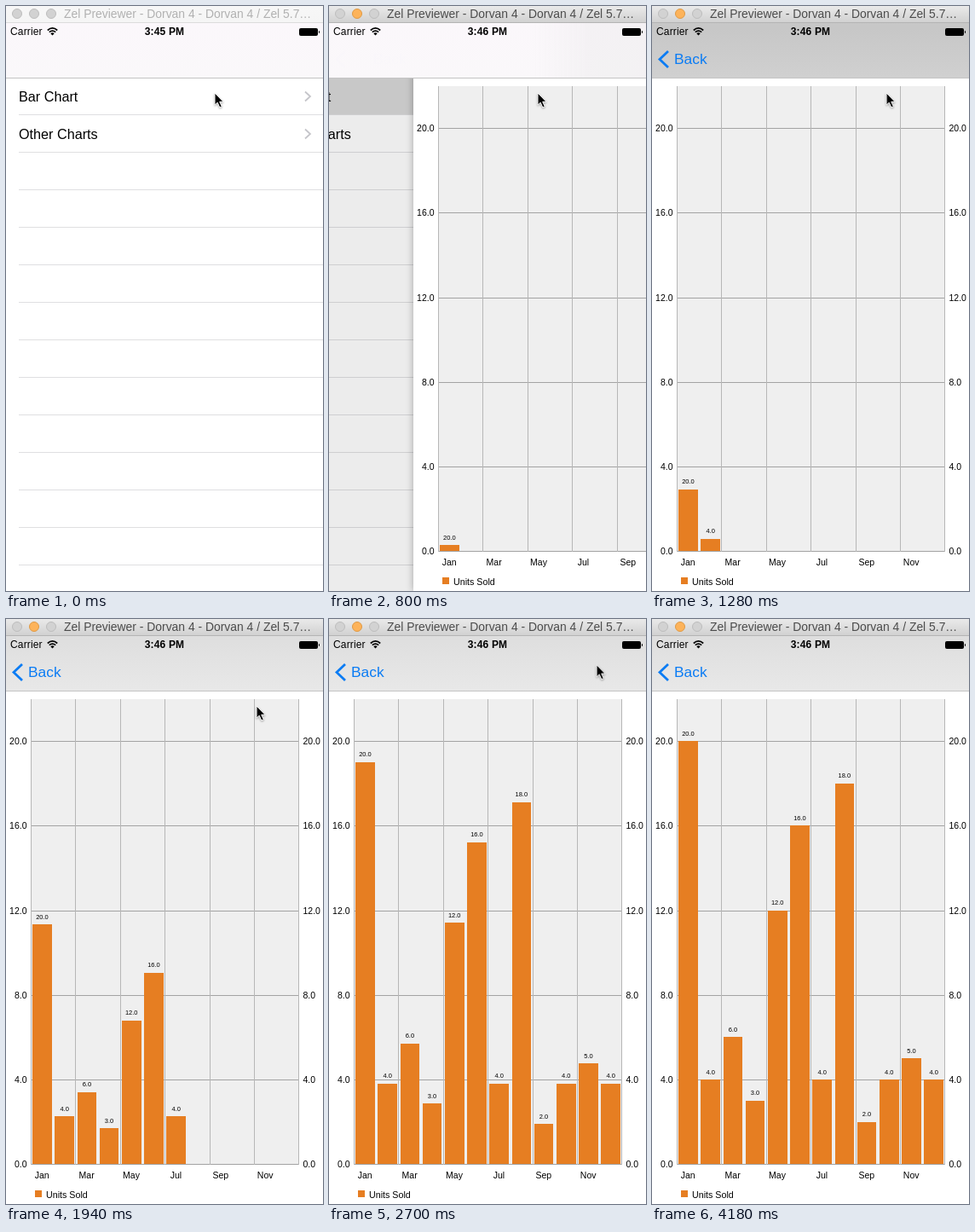
These frames come from a looping animation (372 by 686 pixels, 4.2 s). An HTML page:

```html
<!DOCTYPE html>
<html lang="en">
<head>
<meta charset="utf-8">
<title>Bar chart demo</title>
<style>
@property --t { syntax: "<number>"; inherits: true; initial-value: 0; }

html, body { margin: 0; width: 100%; height: 100%; overflow: hidden; background: #fff; }
body { position: relative; font-family: "Liberation Sans", Arial, sans-serif; color: #000; }
div, svg { position: absolute; }
.stage { left: 0; top: 0; width: 372px; height: 686px; overflow: hidden; background: #fff; }
.stage, .stage * { animation-duration: 4200ms; animation-iteration-count: infinite; animation-timing-function: linear; }
.fill { inset: 0; }
.text { line-height: 20px; white-space: nowrap; }
svg { overflow: visible; fill: none; }

/* Window title bar */
.window { left: 0; top: 0; width: 372px; height: 19px; border-bottom: 1px solid; animation-name: focus; animation-timing-function: step-end; }
.window .text { left: 68px; top: -1px; font-size: 13.9px; }
.dot { top: 3px; width: 10px; height: 10px; border: 1px solid #bdbdbd; border-radius: 50%; background: #d2d2d2; }
.dot.mid { background: var(--mid); border-color: var(--rim); }
@keyframes focus {
  0% { background: linear-gradient(#f7f7f7, #f5f5f5); color: #b1b1b1; border-color: #dcdcdc; --mid: #d2d2d2; --rim: #bdbdbd; }
  6.67%, 100% { background: linear-gradient(#eaeaea, #d1d1d1); color: #4c4c4c; border-color: #b4b4b4; --mid: #fdb35a; --rim: #df9a45; }
}

/* Navigation and status bars */
.nav { left: 0; top: 20px; width: 372px; height: 64px; background: linear-gradient(#fbf7fb, #faf8fa); border-bottom: 1px solid #c4c4c4; overflow: hidden; }
.haze { background: linear-gradient(90deg, transparent 240px, #dcdcdc 300px, #d9d9d9); animation-name: haze; }
.steady { background: linear-gradient(#dedede, #e8e8e8); animation-name: steady; }
.shade { background: #000; animation-name: shade; }
@keyframes haze { 0%, 18% { opacity: 0; } 22.4%, 100% { opacity: .8; } }
@keyframes steady { 0%, 22.5% { opacity: 0; } 26.7%, 100% { opacity: 1; } }
@keyframes shade { 0%, 23.8% { opacity: 0; } 28%, 31% { opacity: .105; } 39%, 100% { opacity: 0; } }
.status { font-size: 12px; top: 20px; letter-spacing: .15px; }
.clock { left: 0; width: 372px; text-align: center; font-weight: bold; animation-timing-function: step-end; }
.early { animation-name: early; }
.late { animation-name: late; }
@keyframes early { 0% { opacity: 1; } 3.8%, 100% { opacity: 0; } }
@keyframes late { 0% { opacity: 0; } 3.8%, 100% { opacity: 1; } }
.battery { left: 344px; top: 26px; width: 22px; height: 9px; border-radius: 2px; background: #000; }
.battery::after { content: ""; position: absolute; left: 22.7px; top: 3px; width: 1.5px; height: 3px; background: #000; border-radius: 0 1px 1px 0; }
.back { color: #0b7cf4; animation-name: appear; }
.back .text { left: 26px; top: 52px; font-size: 17.4px; animation-name: settle; }
@keyframes appear { 0%, 19% { opacity: 0; } 22.4% { opacity: .2; } 27.5%, 100% { opacity: 1; } }
@keyframes settle { 0%, 15.2% { transform: translateX(100px); animation-timing-function: cubic-bezier(.36, .66, .04, 1); } 29.5%, 100% { transform: none; } }

/* Table */
.pages { clip-path: inset(84px 0 0 0); }
.list { animation-name: slideOut; }
.row { left: 0; width: 372px; height: 44px; font-size: 16.2px; }
.row::after { content: ""; position: absolute; left: 15px; right: 0; bottom: 0; height: 1px; background: #dfdfe1; }
.row .text { left: 15px; top: 12px; }
.row svg { left: 350px; top: 16px; stroke: #c5c5ca; stroke-width: 1.8; }
.row .tap { background: #d8d8d8; animation-name: tap; animation-timing-function: step-end; }
.tint { background: #000; animation-name: tint; }
@keyframes tap { 0% { opacity: 0; } 9.5%, 100% { opacity: 1; } }
@keyframes tint {
  0%, 15.238% { opacity: 0; animation-timing-function: cubic-bezier(.36, .66, .04, 1); }
  29.524%, 100% { opacity: .1; }
}
@keyframes slideOut {
  0%, 15.238% { transform: none; animation-timing-function: cubic-bezier(.36, .66, .04, 1); }
  29.524%, 100% { transform: translateX(-111.6px); }
}

/* Chart */
.page { background: #fff; box-shadow: 0 0 9px rgba(0, 0, 0, .35); animation-name: slideIn; }
@keyframes slideIn {
  0%, 15.237% { transform: translateX(400px); }
  15.238% { transform: translateX(372px); animation-timing-function: cubic-bezier(.36, .66, .04, 1); }
  29.524%, 100% { transform: none; }
}
.chart { --p: calc(.5 - .5 * cos(var(--t) * 180deg)); font-size: 10.5px; animation-name: grow; }
@keyframes grow {
  0%, 14.3% { --t: 0; }
  22.38% { --t: .1264; }
  30.476% { --t: .2496; }
  46.19% { --t: .5418; }
  64.286% { --t: .8573; }
  72.4%, 100% { --t: 1; }
}
.plot { left: 29px; top: 94px; width: 315px; height: 545px; background: #efefef; }
.hline { left: 29px; width: 315px; height: 1px; background: #a3a3a3; }
.vline { top: 94px; width: 1px; height: 546px; background: #b7b7b7; }
.bar {
  bottom: 46.8px; width: 22.5px; background: #e67e22;
  left: calc(31.2px + var(--i) * 26.2px);
  height: calc(var(--p) * var(--v) * 24.8px);
  opacity: calc((var(--p) * 12 - var(--i)) * 1000);
}
.bar .text { left: 0; right: 0; top: -18.5px; text-align: center; font-size: 7.5px; }
.left { right: 347.5px; }
.right { left: 348.5px; }
.month { width: 40px; text-align: center; top: 642px; }
.key { left: 34px; top: 670px; width: 8px; height: 8px; background: #e67e22; }
.legend { left: 47px; top: 664.5px; font-size: 10.7px; }

/* Pointer */
.pointer { left: 0; top: 0; width: 12px; height: 20px; animation-name: pointer; filter: drop-shadow(0 1px 1px rgba(0, 0, 0, .35)); }
@keyframes pointer {
  0%, 24% { transform: translate(245px, 102px); }
  30.476% { transform: translate(275px, 102px); }
  34% { transform: translate(290px, 102px); }
  46.19% { transform: translate(294px, 102px); }
  56% { transform: translate(300px, 99px); }
  64.286% { transform: translate(314px, 54px); }
  70.5%, 100% { transform: translate(328px, -26px); }
}
</style>
</head>
<body>
<div class="stage">
  <div class="pages fill">
    <div class="list fill"><div class="tint fill"></div></div>
    <div class="page fill"><div class="chart fill">
      <div class="plot"></div>
      <div class="key"></div>
      <div class="text legend">Units Sold</div>
    </div></div>
  </div>
  <div class="nav">
    <div class="haze fill"></div><div class="steady fill"></div><div class="shade fill"></div>
  </div>
  <div class="text status" style="left:5px">Carrier</div>
  <svg style="left:48px;top:25px" width="13" height="10" stroke="#000" stroke-width="1.7">
    <path d="M.8 3.5Q6.5-1.7 12.2 3.5M2.8 5.7Q6.5 2.4 10.2 5.7"/>
    <path d="M4.3 7.2Q6.5 5.4 8.7 7.2L6.5 9.5Z" fill="#000" stroke="none"/>
  </svg>
  <div class="text status clock early">3:45 PM</div>
  <div class="text status clock late">3:46 PM</div>
  <div class="battery"></div>
  <div class="back fill">
    <svg width="22" height="80" stroke="#0b7cf4" stroke-width="2.8"><path d="M19 53L9 62.5L19 72"/></svg>
    <div class="text">Back</div>
  </div>
  <div class="window">
    <div class="dot" style="left:7px"></div>
    <div class="dot mid" style="left:27px"></div>
    <div class="dot" style="left:47px"></div>
    <div class="text">Zel Previewer - Dorvan 4 - Dorvan 4 / Zel 5.7…</div>
  </div>
  <svg class="pointer" stroke="#fff" stroke-width="1">
    <path d="M0 0V14.2L3.2 11.2L5.8 17L8.3 15.9L5.7 10.3H10Z" fill="#000"/>
  </svg>
</div>
<script>
const list = document.querySelector(".list");
const chart = document.querySelector(".chart");
const tint = document.querySelector(".tint");

function add(parent, cls, style = "", html = "") {
  const el = document.createElement("div");
  el.className = cls;
  el.style.cssText = style;
  el.innerHTML = html;
  parent.append(el);
  return el;
}

const chevron = '<svg width="8" height="12"><path d="M1 .5L7 6L1 11.5"/></svg>';
const items = ["Bar Chart", "Other Charts"];
for (let i = 0; i < 14; i++) {
  const tap = i ? "" : '<div class="tap fill"></div>';
  const label = items[i] ? `<div class="text">${items[i]}</div>${chevron}` : "";
  add(list, "row", `top:${84 + i * 44}px`, label);
  if (tap) list.lastChild.insertAdjacentHTML("afterbegin", tap);
}
list.append(tint);

for (let k = 0; k < 6; k++) {
  const y = 639.2 - k * 99.2;
  const value = (k * 4).toFixed(1);
  add(chart, "hline", `top:${Math.round(y)}px`);
  for (const side of ["left", "right"]) add(chart, `text ${side}`, `top:${y - 10}px`, value);
}
for (let k = 0; k < 7; k++) add(chart, "vline", `left:${Math.round(29 + k * 52.4)}px`);

["Jan", "Mar", "May", "Jul", "Sep", "Nov"].forEach((name, k) =>
  add(chart, "text month", `left:${22.2 + k * 52.4}px`, name));

[20, 4, 6, 3, 12, 16, 4, 18, 2, 4, 5, 4].forEach((v, i) =>
  add(chart, "bar", `--v:${v};--i:${i}`, `<div class="text">${v.toFixed(1)}</div>`));
</script>
</body>
</html>
```
